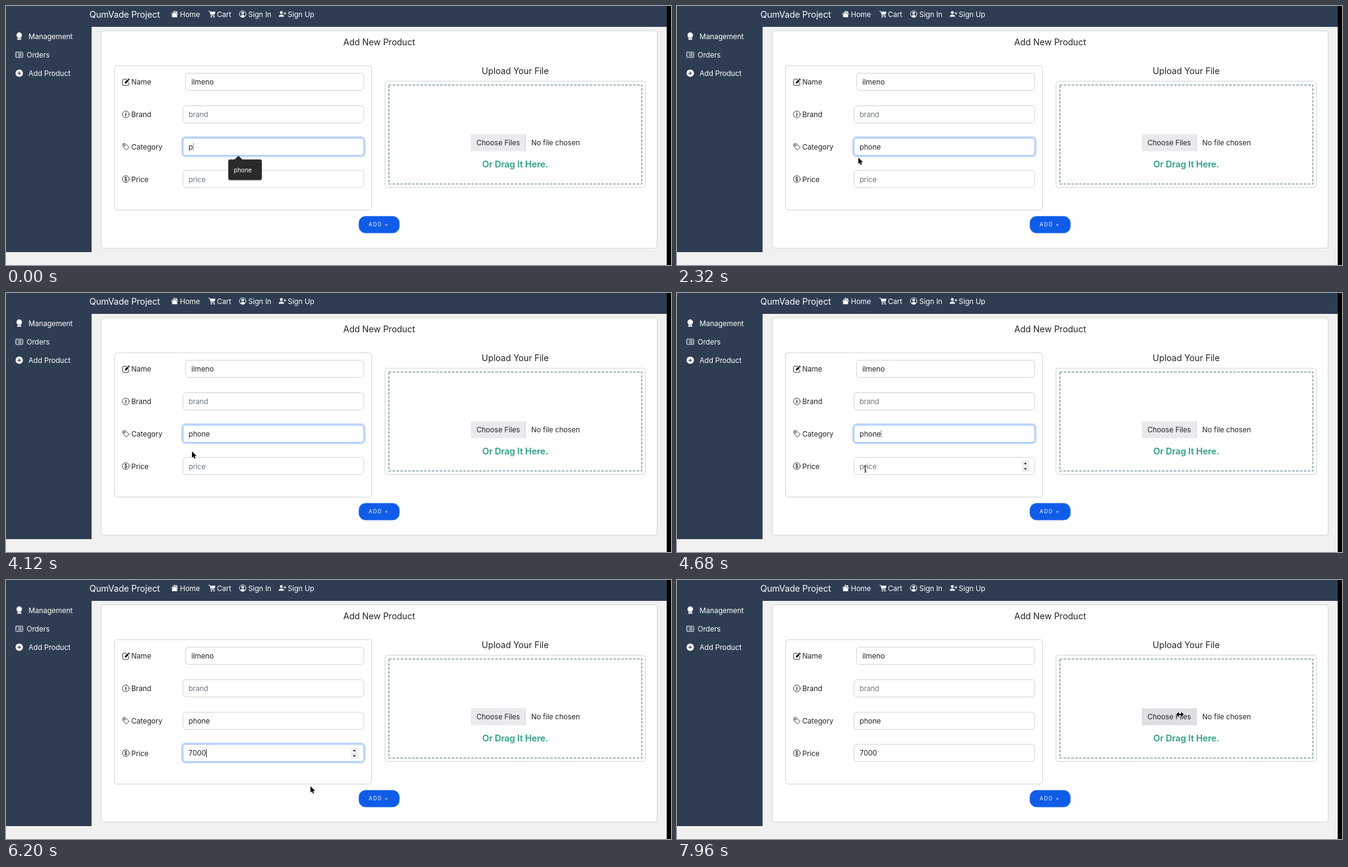
An HTML page that plays this animation: 1080x422 px, repeating every 8 s.

```html
<!DOCTYPE html>
<html lang="en">
<head>
<meta charset="utf-8">
<title>Add New Product</title>
<style>
html, body { margin: 0; width: 100%; height: 100%; overflow: hidden; background: #f1f1f1; }
body { position: relative; font: 11.7px Inter, "Open Sans", sans-serif; letter-spacing: -.004em; color: #212529; }
svg { position: absolute; left: 0; top: 0; width: 1080px; height: 422px; }
text { fill: #212529; white-space: pre; }
.light text, .menu text { fill: #fff; }
.big { font-size: 14.1px; }
.mid { text-anchor: middle; }
.hint { fill: #6c757d; }
.drag { font-weight: 600; font-size: 14.4px; fill: #2d9d87; }
.add { font-size: 8.3px; letter-spacing: 1.5px; fill: #fff; }
.box { fill: #fff; stroke: #d0d3d6; }
.field { fill: #fff; stroke: #ced4da; }
.menu { fill: #2a2a2a; }
.menu text { font-size: 9.8px; letter-spacing: 0; }
.line { fill: none; stroke: currentColor; stroke-linecap: round; stroke-linejoin: round; }
.ring .field { stroke: #94bdfb; }
.ring .glow { fill: none; stroke: #c6dafb; stroke-width: 3; }

.typed { position: absolute; left: 296.5px; height: 28px; line-height: 28px; white-space: nowrap; }
.typed i { display: inline-block; width: 1px; height: 13px; vertical-align: -2.5px; background: #222; }
.typed b { font-weight: 400; }
#category { top: 215.5px; }
#category i { background: #8a8f96; }
#price { top: 268px; }

/* Switches: 1% is 80 ms */
.sw, .typed b, .typed i { animation: 8s step-end infinite; }
#tip { animation-name: tip; }
#ringA { animation-name: ringA; }
#ringB { animation-name: ringB; }
#list { animation-name: list; }
#spin { animation-name: spin; }
#ask { animation-name: ask; }
#hover { animation-name: hover; }
#arrow { animation-name: arrow; }
#beam { animation-name: beam; }
#hand { animation-name: hand; }
#resize { animation-name: resize; }
#category i { animation-name: blinkA; }
#price i { animation-name: blinkB; }
@keyframes tip { 0% { visibility: visible } 7%, 100% { visibility: hidden } }
@keyframes ringA { 0% { visibility: visible } 60%, 100% { visibility: hidden } }
@keyframes ringB { 0%, 92.5%, 100% { visibility: hidden } 60% { visibility: visible } }
@keyframes list { 0%, 67.5%, 100% { visibility: hidden } 61% { visibility: visible } }
@keyframes spin { 0%, 92.5%, 100% { visibility: hidden } 55% { visibility: visible } }
@keyframes ask { 0% { visibility: visible } 67.5%, 100% { visibility: hidden } }
@keyframes hover { 0% { visibility: hidden } 86.5%, 100% { visibility: visible } }
@keyframes arrow { 0%, 55%, 86.5%, 100% { visibility: hidden } 25%, 74% { visibility: visible } }
@keyframes beam { 0%, 67.5%, 100% { visibility: hidden } 55% { visibility: visible } }
@keyframes hand { 0%, 95.5%, 100% { visibility: hidden } 86.5% { visibility: visible } }
@keyframes resize { 0% { visibility: hidden } 95.5%, 100% { visibility: visible } }
@keyframes blinkA {
  0%, 19.5%, 32%, 44.5%, 57% { visibility: visible }
  13.25%, 25.75%, 38.25%, 50.75%, 60%, 100% { visibility: hidden }
}
@keyframes blinkB {
  0%, 66.25%, 78.25%, 90.75%, 100% { visibility: hidden }
  60%, 67.5%, 84.5% { visibility: visible }
}

/* Typed letters take up room only once their key is pressed */
#category b:nth-child(1) { animation-name: key1; }
#category b:nth-child(2) { animation-name: key2; }
#category b:nth-child(3) { animation-name: key3; }
#category b:nth-child(4) { animation-name: key4; }
#price b:nth-child(1) { animation-name: key5; }
#price b:nth-child(2) { animation-name: key6; }
#price b:nth-child(3) { animation-name: key7; }
#price b:nth-child(4) { animation-name: key8; }
@keyframes key1 { 0% { font-size: 0 } 2%, 100% { font-size: 11.7px } }
@keyframes key2 { 0% { font-size: 0 } 4%, 100% { font-size: 11.7px } }
@keyframes key3 { 0% { font-size: 0 } 5.5%, 100% { font-size: 11.7px } }
@keyframes key4 { 0% { font-size: 0 } 7%, 100% { font-size: 11.7px } }
@keyframes key5 { 0% { font-size: 0 } 67.5%, 100% { font-size: 11.7px } }
@keyframes key6 { 0% { font-size: 0 } 69%, 100% { font-size: 11.7px } }
@keyframes key7 { 0% { font-size: 0 } 70.5%, 100% { font-size: 11.7px } }
@keyframes key8 { 0% { font-size: 0 } 72%, 100% { font-size: 11.7px } }

#pointer { animation: move 8s ease-in-out infinite; }
@keyframes move {
  0%, 25% { transform: translate(294px, 241px) }
  28.5%, 34% { transform: translate(294.5px, 247px) }
  42%, 52.5% { transform: translate(302px, 258px) }
  56%, 74% { transform: translate(306px, 287px) }
  77.5%, 80% { transform: translate(494.5px, 336px) }
  88%, 92% { transform: translate(820.5px, 222px) }
  95.5%, 100% { transform: translate(817px, 219px) }
}
</style>
</head>
<body>
<svg viewBox="0 0 1080 422">
  <rect width="1080" height="422" fill="#f1f1f1"/>
  <path d="M0 0H1074V34H139V401H0Z" fill="#2e3d52"/>
  <rect x="1073" width="7" height="422"/>

  <g class="light" fill="#fff" color="#fff">
    <text class="big" x="135.5" y="18.5">QumVade Project</text>
    <text x="282.5" y="17.6">Home</text>
    <text x="342.5" y="17.6">Cart</text>
    <text x="393.5" y="17.6">Sign In</text>
    <text x="457.5" y="17.6">Sign Up</text>
    <text x="36.5" y="53.8">Management</text>
    <text x="33.5" y="83.8">Orders</text>
    <text x="36.5" y="113.8">Add Product</text>

    <!-- house, cart, account, new account -->
    <path d="M268 13.2L273.8 7.6 276.4 10V8.4H278V11.6L279.7 13.2 279 13.9 273.8 9 268.7 13.9ZM269.7 13.9L273.8 10.1 278 13.9V18.2H269.7Z"/>
    <path class="line" d="M329 8.5H331L333 15.5H338.5"/>
    <path d="M331.2 9.3H340.2L338.8 14H332.6Z"/>
    <circle cx="333.6" cy="17.6" r="1.2"/><circle cx="338" cy="17.6" r="1.2"/>
    <circle class="line" cx="384.4" cy="13.2" r="5.3"/>
    <circle cx="384.4" cy="11.6" r="2.2"/>
    <path d="M380.6 16.8Q382 14.6 384.4 14.6T388.2 16.8Q386.7 18.4 384.4 18.4T380.6 16.8Z"/>
    <circle cx="447.2" cy="10.7" r="2.4"/>
    <path d="M442.8 17.6Q443 14 447.2 14T451.6 17.6Z"/>
    <path class="line" d="M451.2 12H454.8M453 10.2V13.8"/>

    <!-- award, list, plus -->
    <circle cx="21.5" cy="47.6" r="4.5"/>
    <path d="M18.6 51.5L21.5 53 24.4 51.5V55.6L21.5 54.6 18.6 55.6Z"/>
    <rect class="line" x="15.8" y="75.2" width="11.4" height="8.6" rx="1"/>
    <path class="line" d="M20.3 77.5H25M20.3 79.5H25M20.3 81.5H25M17.9 77.5H18M17.9 79.5H18M17.9 81.5H18" stroke-width=".9"/>
    <circle cx="21.5" cy="109.6" r="6"/>
    <path d="M18.5 109.6H24.5M21.5 106.6V112.6" stroke="#2e3d52" stroke-width="1.1"/>
  </g>

  <rect class="box" x="154.5" y="40.5" width="903" height="354" rx="4"/>
  <text class="big mid" x="606" y="63.6">Add New Product</text>
  <rect class="box" x="176.5" y="97.2" width="417" height="235.3" rx="4"/>
  <text class="big mid" x="827" y="110.6">Upload Your File</text>
  <rect class="box" x="615.5" y="122.5" width="423" height="173" rx="4"/>
  <rect x="621.8" y="128.8" width="410.8" height="161.2" fill="none" stroke="#80a0a6" stroke-width="1.6" stroke-dasharray="4.2 2.2"/>

  <text x="203.5" y="128.3">Name</text>
  <text x="203.5" y="181">Brand</text>
  <text x="203.5" y="233.8">Category</text>
  <text x="203.5" y="286.5">Price</text>
  <g color="#212529" stroke-width=".9">
    <path class="line" d="M196.2 119.3H190.6Q189.5 119.3 189.5 120.4V128.2Q189.5 129.3 190.6 129.3H198.2Q199.3 129.3 199.3 128.2V124.4"/>
    <path d="M192.7 126.6L193.4 123.7 197.2 119.9 199.2 121.9 195.5 125.7ZM197.8 119.3L199 118.1 201 120.1 199.8 121.3Z"/>
    <circle class="line" cx="194.6" cy="176.6" r="5.5"/>
    <path class="line" d="M194 175.4H194.9L194.3 179.5M194.9 173.5V173.6" stroke-width="1.2"/>
    <path class="line" d="M189.9 225V229L195.6 234.6 200 230.2 194.2 224.6H190.3Z"/>
    <circle class="line" cx="192.6" cy="227.3" r="1"/>
    <circle class="line" cx="194.6" cy="282" r="5.5"/>
    <path class="line" d="M196.6 280.2Q196 279.2 194.6 279.2 192.7 279.2 192.7 280.5 192.7 281.7 194.6 282 196.7 282.4 196.7 283.6 196.7 284.8 194.6 284.8 193 284.8 192.5 283.6M194.6 278.3V285.7"/>
  </g>

  <rect class="field" x="291.5" y="109.5" width="289.5" height="28" rx="4.5"/>
  <text x="301" y="128.3">ilmeno</text>
  <rect class="field" x="287.5" y="162.5" width="293.5" height="28" rx="4.5"/>
  <text class="hint" x="296.5" y="181">brand</text>
  <rect class="field" x="287.5" y="215.3" width="293.5" height="28" rx="4.5"/>
  <rect class="field" x="287.5" y="267.8" width="293.5" height="28" rx="4.5"/>

  <g id="ringA" class="ring sw">
    <rect class="glow" x="286" y="213.8" width="296.5" height="31" rx="6"/>
    <rect class="field" x="287.5" y="215.3" width="293.5" height="28" rx="4.5"/>
  </g>
  <g id="ringB" class="ring sw">
    <rect class="glow" x="286" y="266.3" width="296.5" height="31" rx="6"/>
    <rect class="field" x="287.5" y="267.8" width="293.5" height="28" rx="4.5"/>
  </g>
  <text id="ask" class="hint sw" x="296.5" y="286.5">price</text>
  <g id="spin" class="sw">
    <rect x="560" y="273" width="11.5" height="18" rx="1" fill="#efefef"/>
    <path d="M563.2 279L565.7 276 568.2 279ZM563.2 285.5L565.7 288.5 568.2 285.5Z" fill="#333"/>
  </g>

  <rect x="755" y="209" width="89" height="27.5" fill="#e9eaee"/>
  <rect id="hover" class="sw" x="755" y="209" width="89" height="27.5" fill="#dddfe3"/>
  <path d="M843.5 209V236.5" stroke="#ced4da"/>
  <text x="764" y="227.2">Choose Files</text>
  <text x="853" y="227.2">No file chosen</text>
  <text class="drag mid" x="827" y="262.6">Or Drag It Here.</text>

  <rect x="573" y="342.5" width="66" height="27.5" rx="11" fill="#0f5ce8" stroke="#5c93ee" stroke-width=".8"/>
  <text class="add" x="589" y="359.4">ADD +</text>
</svg>

<div id="category" class="typed">p<b>h</b><b>o</b><b>n</b><b>e</b><i></i></div>
<div id="price" class="typed"><b>7</b><b>0</b><b>0</b><b>0</b><i></i></div>

<svg viewBox="0 0 1080 422">
  <g id="tip" class="menu sw">
    <rect x="361" y="251" width="54.5" height="33.5" rx="3.5" opacity=".3"/>
    <path d="M370.5 250.5L377.5 244 384.5 250.5Z"/>
    <rect x="361" y="250" width="54.5" height="33.5" rx="3"/>
    <text x="370" y="270.6">phone</text>
  </g>
  <g id="list" class="menu sw">
    <path d="M370.5 303.5L377.5 296.8 384.5 303.5Z"/>
    <rect x="361" y="303" width="54.5" height="130" rx="3"/>
    <text x="370" y="323.6">400</text>
    <text x="370" y="350.6">chekc</text>
    <text x="370" y="377.6">500</text>
    <text x="370" y="404.6">82</text>
  </g>
  <g id="pointer" stroke-linejoin="round">
    <path id="arrow" class="sw" d="M0 0V10.4L2.4 8.2 4 12 5.8 11.2 4.2 7.5H7.5Z" stroke="#fff" stroke-width=".8" paint-order="stroke"/>
    <path id="beam" class="sw" d="M-2.3 -5Q0 -5 0 -3.5 0 -5 2.3 -5M0 -3.5V3.5M-2.3 5Q0 5 0 3.5 0 5 2.3 5M-1.3 1.5H1.3" fill="none" stroke="#111"/>
    <path id="hand" class="sw" d="M-1.8 -6Q-.6 -7 .2 -5.6L1.2 -2.4Q2.4 -3.2 3.2 -2 4.4 -2.6 5 -1.4 6.3 -1.6 6.6 -.2L6.9 2.6Q6.9 4.4 5.8 6.4H.2Q-1.8 4.2 -3.4 1.6 -3.8 .2 -2.6 .2L-1 1.4 -2.4 -4.6Q-2.5 -5.4 -1.8 -6ZM2.2 2V4.4M4 2V4.4" fill="#fff" stroke="#111" stroke-width=".9"/>
    <path id="resize" class="sw" d="M-5.8 0L-2 -4V-1.1H2V-4L5.8 0 2 4V1.1H-2V4Z" stroke="#fff" stroke-width=".6" paint-order="stroke"/>
  </g>
</svg>
</body>
</html>
```
